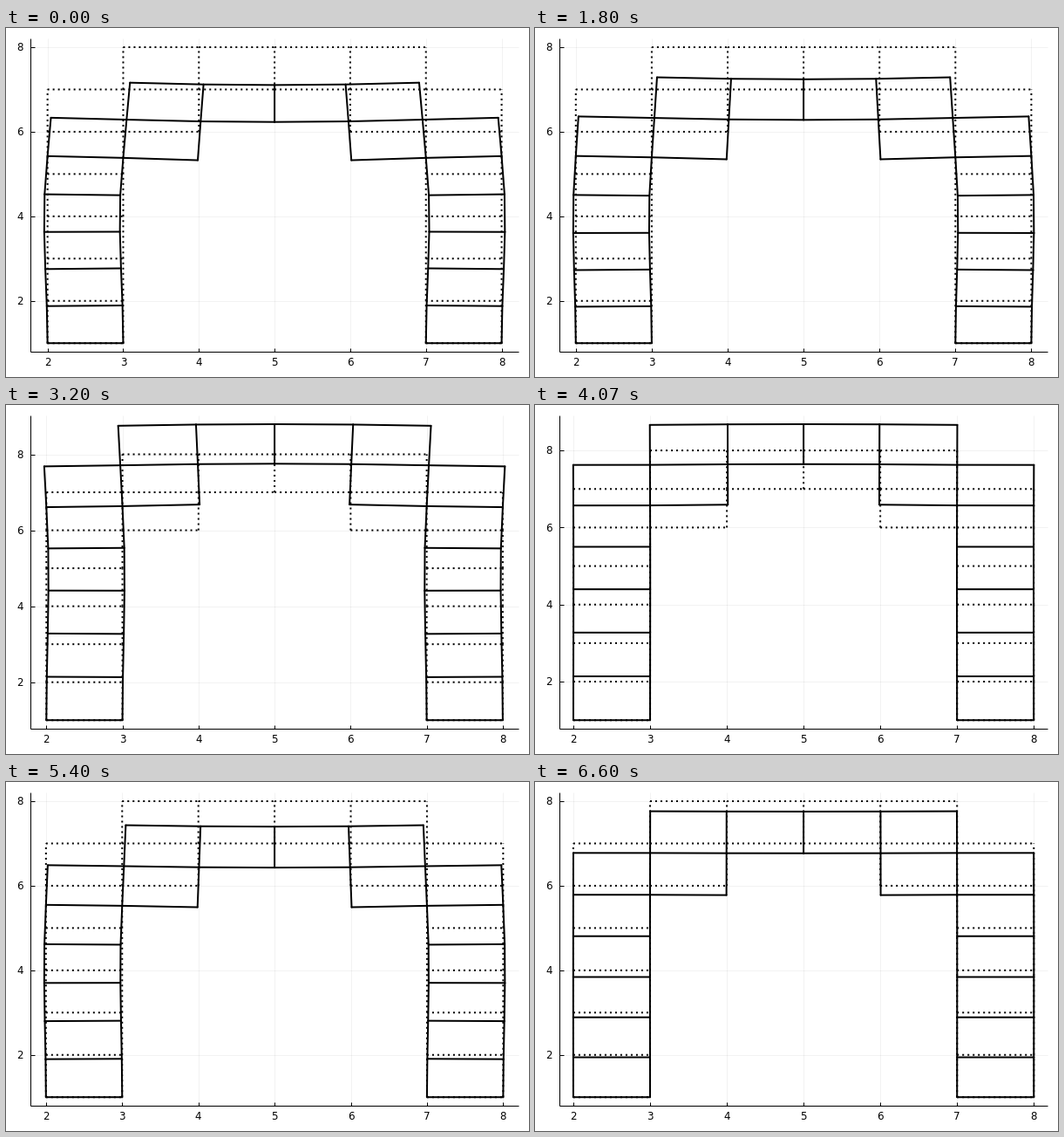
These frames come from a looping animation (600x400 px, 6.67 s). A matplotlib script:

```python
import numpy as np
import matplotlib.pyplot as plt
from matplotlib.animation import FuncAnimation
from matplotlib.collections import LineCollection

W, H, DPI = 600, 400, 100
PX = 72 / DPI
LEFT, RIGHT, TOP, BOTTOM = 28.0, 588.2, 11.8, 371.4
PAD = 0.03 / 1.06
TICKS_X, TICKS_Y = range(2, 9), range(2, 9, 2)

# The motion advances in STEPS poses; the finer ticks keep pose changes on time
LOOP, STEPS, FRAMES = 6670, 100, 290

# Slow extra leaning of the arch: step and amount
BEND_AT = [0, 15, 27, 48, 61, 81, 99]
BEND = [0.016, 0.029, 0, 0.018, 0.063, -0.009, -0.022]


def wave(step, speed, phase=0):
    """Cosine with speed in degrees per step."""
    return np.cos(np.radians(speed * step + phase))


def build_edges():
    half = [(2, y) for y in range(1, 7)] + [(3, 6), (3, 7), (4, 7)]
    cells = half + [(9 - x, y) for x, y in half]
    edges = set()
    for x, y in cells:
        edges |= {((x, y), (x + 1, y)), ((x, y + 1), (x + 1, y + 1)),
                  ((x, y), (x, y + 1)), ((x + 1, y), (x + 1, y + 1))}
    return sorted(edges)


EDGES = build_edges()
NODES = sorted({n for e in EDGES for n in e})


def pose(step):
    """Moved position of every node: stretching plus bending."""
    main = wave(step, 26.29, -11.3)
    bend = np.interp(step, BEND_AT, BEND)
    h = np.arange(8)

    # Stretch along the columns, with the top layer settling after release
    u = np.minimum(h / 6, 1)
    bulge = 0.042 * wave(step, 16.9) - 0.065 * main
    rise = (-0.705 * main * u + bulge * np.sin(np.pi * u)
            + 0.012 * main * np.sin(2 * np.pi * u))
    rise[7] -= 0.042 * main + 0.085 * np.exp(-step / 5)

    # Columns bow one way, their heads lean the other
    lean = 0.075 * main + bend
    sway = lean * np.where(h < 5, 0.027 * h**2 * (h - 5), 0.5 * (h - 5))
    slope = np.gradient(sway)
    slope[0] = 0
    sag = -0.05 * main - 0.4 * bend

    moved = {}
    for x, y in NODES:
        k, near = y - 1, min(x, 10 - x)
        dx = sway[k]
        dy = rise[k] - slope[k] * (min(near, 3) - 2.5)
        if near > 3:
            dy += sag * (1 if near == 5 or y == 6 else 0.75)
            dx = 0 if near == 5 else 0.85 * dx - 0.015 * main
        moved[x, y] = (x + (dx if x < 5 else -dx), y + dy)
    return moved


fig = plt.figure(figsize=(W / DPI, H / DPI), dpi=DPI, facecolor="white")
ax = fig.add_axes([0, 0, 1, 1])
ax.set(xlim=(0, W), ylim=(H, 0))
ax.axis("off")


def add_lines(width, **style):
    lines = LineCollection([], linewidths=width * PX, **style)
    return ax.add_collection(lines, autolim=False)


def add_labels(values):
    return [ax.text(0, 0, str(v), family="DejaVu Sans", fontsize=8.6,
                    ha="center", va="baseline") for v in values]


grid = add_lines(1, colors=[(0, 0, 0, 0.05)], zorder=1)
frame = add_lines(1, colors="black", zorder=2)
rest = add_lines(2, colors="black", linestyles=[(0, (1, 2))], zorder=3)
body = add_lines(2, colors="black", capstyle="round", zorder=4)
rest.set_snap(False)
body.set_snap(False)
labels_x, labels_y = add_labels(TICKS_X), add_labels(TICKS_Y)


def draw(i):
    step = min(int((i + 1.2) * STEPS / FRAMES), STEPS - 1)
    moved = pose(step)
    pts = np.array(list(moved.values()))
    reach = max(3, np.abs(pts[:, 0] - 5).max())
    peak = max(8, pts[:, 1].max())
    sx = (RIGHT - LEFT) * (0.5 - PAD) / reach
    sy = (BOTTOM - TOP) * (1 - 2 * PAD) / (peak - 1)
    base = BOTTOM - PAD * (BOTTOM - TOP)

    def to_px(p):
        return (LEFT + RIGHT) / 2 + (p[0] - 5) * sx, base - (p[1] - 1) * sy

    rest.set_segments([[to_px(a), to_px(b)] for a, b in EDGES])
    body.set_segments([[to_px(moved[a]), to_px(moved[b])] for a, b in EDGES])

    xs = [to_px((v, 1))[0] for v in TICKS_X]
    ys = [to_px((5, v))[1] for v in TICKS_Y]
    grid.set_segments([[(x, TOP), (x, BOTTOM)] for x in xs]
                      + [[(LEFT, y), (RIGHT, y)] for y in ys])
    frame.set_segments([[(LEFT, TOP), (LEFT, BOTTOM)],
                        [(LEFT, BOTTOM), (RIGHT, BOTTOM)]]
                       + [[(x, BOTTOM), (x, BOTTOM - 4.5)] for x in xs]
                       + [[(LEFT, y), (LEFT + 4.5, y)] for y in ys])
    for x, label in zip(xs, labels_x):
        label.set_position((x, 387.4))
    for y, label in zip(ys, labels_y):
        label.set_position((16, y + 4.3))
    return [grid, frame, rest, body, *labels_x, *labels_y]


anim = FuncAnimation(fig, draw, frames=FRAMES, interval=LOOP / FRAMES,
                     init_func=lambda: draw(0), repeat=True, repeat_delay=0)
plt.show()
```
